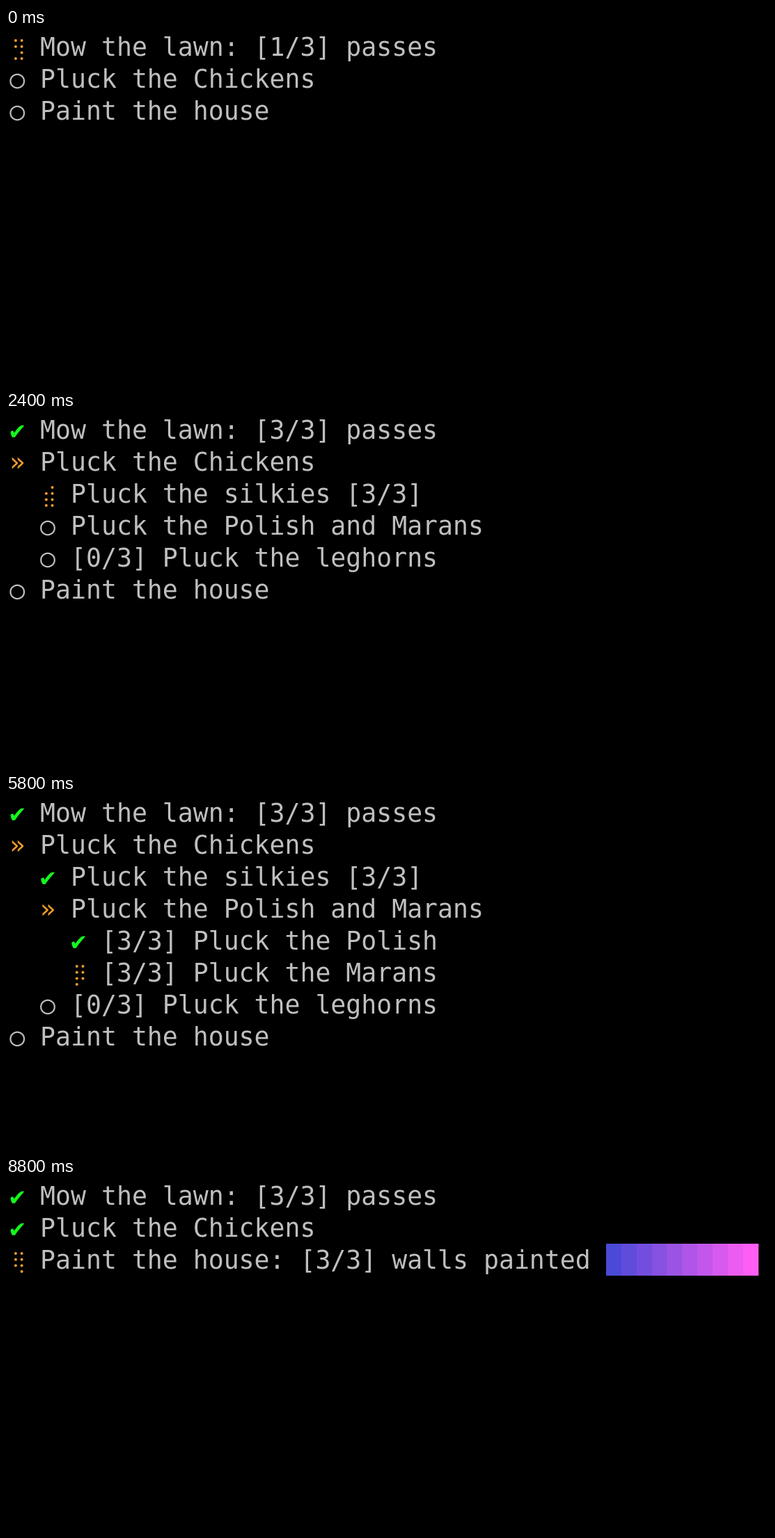
An HTML page with a canvas that plays this animation: 1096 px wide and 511 px high, repeating every 8.9 s.

```html
<!DOCTYPE html>
<html lang="en">
<head>
<meta charset="utf-8">
<title>Chores</title>
<style>
  html, body { margin: 0; width: 100%; height: 100%; overflow: hidden; background: #000; }
  canvas { display: block; width: 1096px; height: 511px; }
</style>
</head>
<body>
<canvas id="stage" width="1096" height="511"></canvas>
<script>
const ctx = document.getElementById('stage').getContext('2d');
const LOOP = 8900, TICK = 100, STEP = 500, TASK = 1500;
const CELL = 21.96, LINE = 46, LEFT = 5.2, TOP = 4, BASE = 36;
const FONT = '36.48px "DejaVu Sans Mono", monospace';
const INK = '#bfbfbf', ORANGE = '#f39c2c', GREEN = '#14f91e';

// Spinner dots as [column, row]; the gap walks around the ring.
const RING = [[0, 0], [0, 1], [0, 2], [0, 3], [1, 3], [1, 2], [1, 1], [1, 0]];

// Each task starts when the previous one ends; the spinner runs slightly slower than the screen.
const task = (start, lead = 20, period = 121, delay = 0) => ({ start, lead, period, delay });
const mow = task(-100, 150);
const silkies = task(1400);
const polish = task(2900);
const marans = task(4400, 20, 116, 100);
const leghorns = task(5900);
const paint = task(7400);

const xAt = col => LEFT + col * CELL;
const yAt = row => TOP + row * LINE;

const mix = (a, b, k) =>
  `rgb(${a.map((v, i) => Math.round(v + (b[i] - v) * k)).join()})`;

function write(text, col, row, color = INK) {
  ctx.fillStyle = color;
  [...text].forEach((ch, i) => ctx.fillText(ch, xAt(col + i), yAt(row) + BASE));
}

function spinner(step, col, row) {
  ctx.fillStyle = ORANGE;
  RING.forEach(([dx, dy], i) => {
    if (i === step % 8) return;
    ctx.beginPath();
    ctx.arc(xAt(col) + 8.7 + dx * 8.7, yAt(row) + 14 + dy * 8.7, 2, 0, 7);
    ctx.fill();
  });
}

const state = (job, t, length = TASK) =>
  t < job.start ? 'wait' : t < job.start + length ? 'run' : 'done';

function count(job, t) {
  const dt = t - job.start;
  if (dt < job.delay) return '[0/3]';
  return `[${Math.max(0, Math.min(3, 1 + Math.floor(dt / STEP)))}/3]`;
}

function mark(job, t, col, row) {
  const now = state(job, t);
  if (now === 'wait') write('○', col, row);
  else if (now === 'done') write('✔', col, row, GREEN);
  else spinner(Math.floor((t - job.start + job.lead) / job.period), col, row);
}

function drawBar(share, col, row) {
  const full = Math.round(10 * share), y = yAt(row);
  for (let i = 0; i < 10; i++) {
    const x = Math.round(xAt(col + i)), width = Math.round(xAt(col + i + 1)) - x;
    if (i < full) {
      ctx.fillStyle = mix([75, 74, 216], [255, 94, 244], i / 9);
      ctx.fillRect(x, y, width, LINE);
    } else {
      ctx.fillStyle = '#606060';
      for (let dy = 0; dy < LINE; dy += 4)
        for (let dx = dy % 8 / 2; dx < width; dx += 4)
          ctx.fillRect(x + dx, y + dy, 2, 2);
    }
  }
}

function draw(t) {
  let row = 0;
  const line = (job, depth, text) => {
    mark(job, t, depth * 2, row);
    write(text, depth * 2 + 2, row++);
  };
  const group = (now, depth, text) => {
    const icon = { wait: '○', run: '»', done: '✔' }[now];
    const color = { wait: INK, run: ORANGE, done: GREEN }[now];
    write(icon, depth * 2, row, color);
    write(text, depth * 2 + 2, row++);
    return now === 'run';
  };

  ctx.fillStyle = '#000';
  ctx.fillRect(0, 0, 1096, 511);
  ctx.font = FONT;

  line(mow, 0, `Mow the lawn: ${count(mow, t)} passes`);
  if (group(state(silkies, t, 4 * TASK), 0, 'Pluck the Chickens')) {
    line(silkies, 1, `Pluck the silkies ${count(silkies, t)}`);
    if (group(state(polish, t, 2 * TASK), 1, 'Pluck the Polish and Marans')) {
      line(polish, 2, `${count(polish, t)} Pluck the Polish`);
      line(marans, 2, `${count(marans, t)} Pluck the Marans`);
    }
    const bird = state(leghorns, t) === 'wait' ? 'leghorns' : 'Leghorns';
    line(leghorns, 1, `${count(leghorns, t)} Pluck the ${bird}`);
  }
  if (state(paint, t) === 'wait') {
    line(paint, 0, 'Paint the house');
  } else {
    const done = count(paint, t);
    drawBar(done[1] / 3, 39, row);
    line(paint, 0, `Paint the house: ${done} walls painted`);
  }
}

function frame() {
  const t = performance.now() % LOOP;
  draw(Math.floor(t / TICK) * TICK);
  requestAnimationFrame(frame);
}
frame();
</script>
</body>
</html>
```
